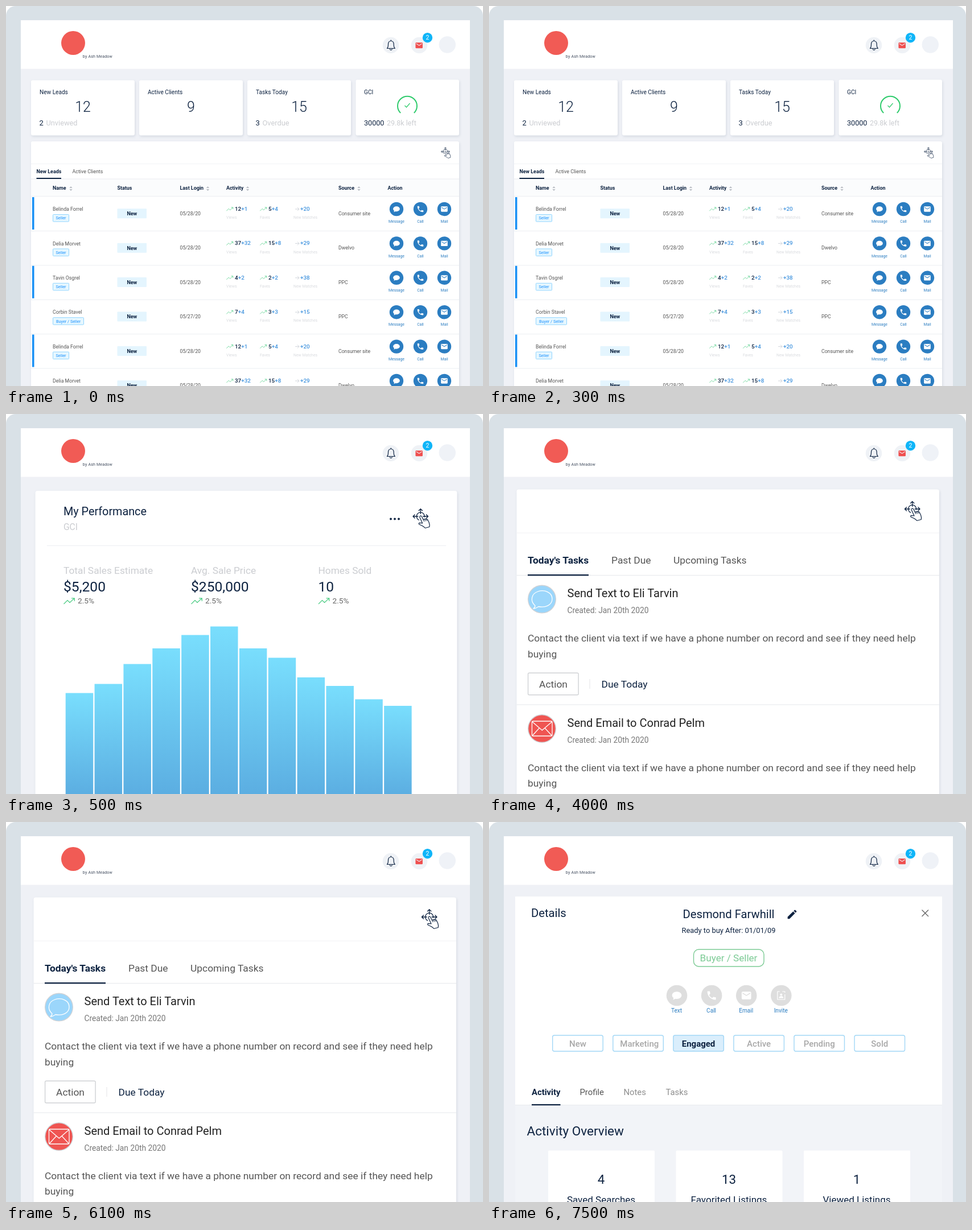
An HTML page that plays this animation: 838x668 px, repeating every 8000 ms.

```html
<!DOCTYPE html>
<html lang="en">
<head>
<meta charset="utf-8">
<title>Agent dashboard</title>
<style>
  html, body { margin: 0; width: 100%; height: 100%; overflow: hidden; background: #fff; }
  svg { display: block; width: 838px; height: 668px; font-family: Roboto, sans-serif; }
  .panel { filter: drop-shadow(1px 2px 2px rgba(40, 60, 90, .13)); }
</style>
</head>
<body>
<svg id="stage" viewBox="0 0 838 668"></svg>
<script>
const NAVY = '#0d2240', INK = '#222', GREY = '#555', PALE = '#cbcdd1', BLUE = '#2b7dc1', GREEN = '#57cf8b';

const ICONS = {
  chat: 'M12 4C6.5 4 2 7.4 2 11.6c0 2.2 1.2 4.1 3.2 5.5L4 21l5.2-2.2c.9.2 1.8.3 2.8.3 5.5 0 10-3.4 10-7.5S17.5 4 12 4z',
  phone: 'M6.6 10.8c1.4 2.8 3.8 5.1 6.6 6.6l2.2-2.2c.3-.3.7-.4 1-.3 1.1.4 2.3.6 3.6.6q1 0 1 1V20q0 1-1 1C10.6 21 3 13.4 3 4q0-1 1-1h3.5q1 0 1 1c0 1.2.2 2.4.6 3.6.1.3 0 .7-.3 1z',
  mail: 'M20 4H4a2 2 0 0 0-2 2v12a2 2 0 0 0 2 2h16a2 2 0 0 0 2-2V6a2 2 0 0 0-2-2zm0 4l-8 5-8-5V6l8 5 8-5z',
  pencil: 'M3 17.2V21h3.8L17.8 9.9l-3.7-3.7zM20.7 7q.7-.7 0-1.4l-2.3-2.3q-.7-.7-1.4 0l-1.9 1.8 3.8 3.8z',
};

// Text is placed by the vertical centre of its capitals.
const text = (x, y, size, str, fill = NAVY, weight = 400, anchor = 'start', extra = '') =>
  `<text x="${x}" y="${y + size * .355}" font-size="${size}" fill="${fill}" font-weight="${weight}" text-anchor="${anchor}" ${extra}>${str}</text>`;
const centred = (x, y, size, str, fill, weight) => text(x, y, size, str, fill, weight, 'middle');
const rect = (x, y, w, h, fill, extra = '') =>
  `<rect x="${x}" y="${y}" width="${w}" height="${h}" fill="${fill}" ${extra}/>`;
const panel = (x, y, w, h, r = 3) => rect(x, y, w, h, '#fff', `rx="${r}" class="panel"`);
const box = (x, y, w, h, r, stroke, fill = '#fff', width = 1.4) =>
  rect(x, y, w, h, fill, `rx="${r}" stroke="${stroke}" stroke-width="${width}"`);
const circle = (x, y, r, fill, extra = '') => `<circle cx="${x}" cy="${y}" r="${r}" fill="${fill}" ${extra}/>`;
const rule = (x, y, w, fill = '#eceef2', h = 1) => rect(x, y, w, h, fill);
const stroke = (d, colour, width, fill = 'none') =>
  `<path d="${d}" fill="${fill}" stroke="${colour}" stroke-width="${width}" stroke-linejoin="round"/>`;
const at = (x, y, scale, body) => `<g transform="translate(${x} ${y}) scale(${scale})">${body}</g>`;
const icon = (name, x, y, size, fill) =>
  at(x, y, size / 24, `<path d="${ICONS[name]}" fill="${fill}" transform="translate(-12 -12)"/>`);
const trend = (x, y, scale) =>
  at(x, y, scale, stroke('M.5 11 7 4.5 11 8.5 19 1M14 .8H19.3V6', GREEN, 1.3));
const each = (items, draw) => items.map(draw).join('');

const dragCursor = (x, y, scale = 1) => at(x, y, scale,
  each([0, 90, 270], turn => `<g transform="rotate(${turn})">${stroke('M0-4V-13M-3.5-9.8 0-13.3 3.5-9.8', NAVY, 1.3)}</g>`) +
  stroke('M-2.5 6.5A7 7 0 1 1 6.8 1.5', NAVY, 1.3) +
  stroke('M-.8-.8Q.8-1.800 2 .2L5 6Q5.500 4.300 7.300 5.200 8 3.700 9.800 4.900 11 3.900 12.300 5.500L14.800 10.500Q16.500 15 15.500 18.500L8 20.500Q6 18 3 16.500L-2.500 14Q-4 12-1.500 11.300L3.300 12-1.300 2Q-2 0-.8-.8Z', NAVY, 1.2, '#fff') +
  stroke('M5 6 6.5 9M7.300 5.200 9 8.500M9.800 4.900 11.500 8', NAVY, 1));

const frame = () =>
  rect(0, 0, 838, 700, '#d9e1e7', 'rx="17"') + rect(26, 25, 789, 643, '#eff1f6') + rect(26, 25, 789, 85.5, '#fff') +
  circle(118, 65, 21, '#f15b55') +
  text(187, 88.5, 7, 'by Ash Meadow', '#3f4a5c', 400, 'end', 'letter-spacing=".2"') +
  circle(676, 69, 14.3, '#eff2f6') + circle(726, 69, 14.3, '#eff2f6') + circle(775.3, 68, 14.7, '#eff2f7') +
  stroke('M669.5 74.5Q671.5 72.5 671.5 67.5C671.5 63 673.5 61.5 676.3 61.5S681.2 63 681.2 67.5Q681.2 72.5 683.3 74.5ZM676.3 61.5V59.5M674 75.5Q676.3 79.5 678.6 75.5', NAVY, 1.2) +
  icon('mail', 725.7, 69.3, 15, '#ef4f4f') +
  circle(740.5, 55.7, 8.7, '#0fb5f8') + centred(740.5, 55.7, 10.5, '2', '#fff');

const sorter = x =>
  `<path d="M${x - 2.7} 320l2.7-3 2.7 3zM${x - 2.7} 322l2.7 3 2.7-3z" fill="#b9bdc4"/>`;

function leadRow([name, kind, date, views, faves, matches, source], index) {
  const y = 365 + 60.4 * index, badge = kind === 'Seller' ? 29 : 55;
  const metric = (x, [count, added], label) =>
    trend(x, y - 11.5, .61) +
    text(x + 15, y - 8.5, 9.9, `${count}<tspan fill="#4294de">+${added}</tspan>`, NAVY, 500) +
    text(x, y + 6.7, 6.9, label, '#d9dbdf');
  const action = (x, glyph, label) =>
    circle(x, y - 8, 12.2, BLUE) + icon(glyph, x, y - 8, 14, '#fff') + centred(x, y + 13.8, 6.9, label, BLUE);
  return (index % 2 ? '' : rect(46, y - 29, 3.5, 57, '#1890f5')) +
    text(82, y - 8, 8.75, name, GREY) +
    box(82.5, y + 1.5, badge - 1, 12.5, 1, '#91d5ff', '#e6f7ff', 1) +
    centred(82 + badge / 2, y + 7.8, 7.3, kind, '#1890ff') +
    rect(195.5, y - 8.7, 51.5, 17, '#e4f5fe', 'rx="1"') + centred(221.3, y, 9, 'New', NAVY, 700) +
    text(305.5, y, 8.7, date, GREY) +
    metric(387, views, 'Views') + metric(446, faves, 'Faves') +
    stroke(`M508 ${y - 8}h7m-3-3 3 3-3 3`, '#c6cbd2', .8) +
    text(517, y - 8.5, 9.9, '+' + matches, '#4294de', 500) + text(505, y + 6.7, 6.9, 'New Matches', '#d9dbdf') +
    text(584, y, 8.7, source, GREY) +
    action(686, 'chat', 'Message') + action(728, 'phone', 'Call') + action(770, 'mail', 'Mail') +
    rule(44, y + 30, 752);
}

function leads() {
  const people = [
    ['Belinda Forrel', 'Seller', '05/28/20', [12, 1], [5, 4], 20, 'Consumer site'],
    ['Delia Morvet', 'Seller', '05/28/20', [37, 32], [15, 8], 29, 'Dwelvo'],
    ['Tavin Osgrel', 'Seller', '05/28/20', [4, 2], [2, 2], 38, 'PPC'],
    ['Corbin Stavel', 'Buyer / Seller', '05/27/20', [7, 4], [3, 3], 15, 'PPC'],
  ];
  const cards = [['New Leads', 12, 2, 'Unviewed'], ['Active Clients', 9], ['Tasks Today', 15, 3, 'Overdue']];
  const columns = [[82, 'Name', 114], [195.5, 'Status'], [305.5, 'Last Login', 354.5], [387, 'Activity', 424.5], [584, 'Source', 620], [670.5, 'Action']];
  return each(cards, ([title, total, count, note], i) => {
    const x = 44 + 190 * i;
    return panel(x, 130.5, 182, 97) + text(x + 15, 151.5, 10.1, title) + centred(x + 91, 177, 25, total, NAVY, 300) +
      (count ? text(x + 14.5, 205, 13, count) + text(x + 26.5, 205, 12.8, note, PALE) : '');
  }) +
    panel(614.5, 129.5, 181.5, 98) + text(629, 151, 10.1, 'GCI') +
    stroke('M693.2 188A17 17 0 1 1 716.8 188', '#2fcb6c', 2) + stroke('M700.5 175 703.5 178 709.5 171', '#2fcb6c', 1.2) +
    text(629, 205.5, 12.6, '30000') + text(669, 205.5, 12.5, '29.8k left', PALE) +
    panel(44, 238, 752, 440) + dragCursor(772, 256, .56) +
    rule(44, 277, 752, '#f1f3f6') + text(53.5, 291, 8.9, 'New Leads', NAVY, 700) + text(116.5, 291, 8.9, 'Active Clients', GREY) +
    rect(44, 304, 752, 30, '#fbfcfd') + rule(44, 303.5, 752) + rule(44, 334, 752) + rule(53.5, 302, 43.5, NAVY, 2) +
    each(columns, ([x, label, sort]) => text(x, 320, 8.9, label, NAVY, 700) + (sort ? sorter(sort) : '')) +
    each([...people, ...people.slice(0, 2)], leadRow);
}

function sales() {
  const stats = [[101, 'Total Sales Estimate', '$5,200'], [325, 'Avg. Sale Price', '$250,000'], [548.5, 'Homes Sold', '10']];
  const tops = [490.5, 474.5, 439.5, 412, 388.5, 373.5, 412, 428.5, 463, 478, 501.5, 513];
  return '<linearGradient id="bar" x2="0" y2="1"><stop stop-color="#79defd"/><stop offset="1" stop-color="#5bade1"/></linearGradient>' +
    panel(51.5, 135, 741, 550, 4) + text(101, 171, 19.8, 'My Performance') + text(101, 198.5, 15.6, 'GCI', PALE) +
    each([676, 683, 690], x => circle(x, 184.5, 1.9, NAVY)) + dragCursor(728.3, 180) + rule(72, 231, 701) +
    each(stats, ([x, label, value]) => text(x, 275, 17.3, label, PALE) + text(x, 303.5, 24.6, value) +
      trend(x, 323, 1) + text(x + 25, 328.5, 13.7, '2.5%', '#666')) +
    each(tops, (top, i) => rect(104.7 + 50.86 * i, top, 48.5, 672 - top, 'url(#bar)'));
}

function tasks() {
  const bubble = 'M81 337C72 329 74 316 86 312 98 308 111 314 111 325S99 341 87 338.5Q82 342 78 342 81 340 81 337Z';
  const envelope = 'M77.5 540h31.5a2 2 0 0 1 2 2v22a2 2 0 0 1-2 2h-31.5a2 2 0 0 1-2-2v-22a2 2 0 0 1 2-2zM76 541l17.3 15 17.3-15M76 565.5l12.5-13.5M110.5 565.5 98 552';
  const task = (y, title, fill, glyph) =>
    circle(93, y + 10.5, 24.3, fill, 'stroke="#cfd2d6" stroke-width="1.4"') + stroke(glyph, '#fff', 1.3) +
    text(137.5, y, 20, title, INK) + text(137.5, y + 30.5, 13.8, 'Created: Jan 20th 2020', '#777') +
    text(68, y + 79, 17.42, 'Contact the client via text if we have a phone number on record and see if they need help', GREY) +
    text(68, y + 106.5, 17.42, 'buying', GREY);
  return panel(48.5, 132.5, 742.5, 560, 4) + dragCursor(743.7, 167) + rule(48.5, 208.5, 742.5, '#f1f2f5') +
    text(68, 257, 17.35, "Today's Tasks", NAVY, 700) + text(215, 257, 17.4, 'Past Due', GREY) + text(324, 257, 17.4, 'Upcoming Tasks', GREY) +
    rule(48.5, 283, 742.5, '#e6e8eb') + rule(68, 282, 107, NAVY, 2.3) +
    task(315, 'Send Text to Eli Tarvin', '#9bd6fb', bubble) +
    box(68.6, 455.2, 88.5, 38.5, 2, '#d0d2d5') + centred(113, 475, 17.4, 'Action', GREY) +
    rect(176.5, 466, 1, 17, '#e3e5e8') + text(197.5, 475, 17.4, 'Due Today') + rule(48.5, 510.5, 742.5, '#e6e8eb') +
    task(542.5, 'Send Email to Conrad Pelm', '#ef5552', envelope);
}

function details() {
  const invite = stroke('M-2.5-7H-6.5V7H6.5V-2M2-7H6.5V-5', '#fff', 1.2) +
    circle(0, -1.5, 2, '#fff') + '<path d="M-4 4.5Q-4 1 0 1T4 4.5Z" fill="#fff"/>';
  const contacts = [['Text', 'chat'], ['Call', 'phone'], ['Email', 'mail'], ['Invite']];
  const stages = ['New', 'Marketing', 'Engaged', 'Active', 'Pending', 'Sold'];
  const tabs = [[75, 'Activity', NAVY, 700], [159.5, 'Profile', GREY], [236.5, 'Notes', '#8d8d8d'], [310.5, 'Tasks', '#8d8d8d']];
  const totals = [[4, 'Saved Searches'], [13, 'Favorited Listings'], [1, 'Viewed Listings']];
  return rect(46, 131, 750, 537, '#f2f4f8') + rect(46, 131, 750, 366.5, '#fff') +
    text(74, 160, 20.2, 'Details') + centred(421, 162, 20.2, 'Desmond Farwhill') + icon('pencil', 532.5, 162.3, 21, NAVY) +
    stroke('M760.5 154.5 772 166M772 154.5 760.5 166', '#666', 1.3) +
    centred(421, 190, 12.85, 'Ready to buy After: 01/01/09') +
    box(359.5, 224, 123.5, 30, 9, '#7ccb95') + centred(421, 239.2, 17.1, 'Buyer / Seller', '#7ccb95') +
    each(contacts, ([label, glyph], i) => {
      const x = 330 + 61.1 * i;
      return circle(x, 305, 18.3, '#dedede') + (glyph ? icon(glyph, x, 305, 20, '#fff') : at(x, 305, 1, invite)) +
        centred(x - .5, 331.3, 10.1, label, BLUE);
    }) +
    each(stages, (label, i) => {
      const x = 111.7 + 106.07 * i, active = label === 'Engaged';
      return box(x, 375, 88.5, 28, 3, '#a2d7f6', active ? '#daeefc' : '#fff') +
        centred(x + (label === 'Marketing' ? 46.5 : 44.2), 390, 15, label, active ? NAVY : '#a8a8a8', active ? 700 : 500);
    }) +
    each(tabs, ([x, label, fill, weight]) => text(x, 475.2, 14.8, label, fill, weight)) +
    rule(46, 497, 750, '#e9ebef') + rule(75, 496, 50.5, NAVY, 2.2) +
    text(66.5, 543.5, 22.5, 'Activity Overview') +
    each(totals, ([count, label], i) => {
      const x = 104 + 224.5 * i;
      return rect(x, 577.5, 187, 100, '#fff', 'rx="2"') + centred(x + 93, 628, 22.3, count) + centred(x + 93, 664, 17, label);
    });
}

const stage = document.getElementById('stage');
stage.innerHTML = frame() + each([leads, sales, tasks, details], scene => `<g class="scene">${scene()}</g>`);
const scenes = stage.querySelectorAll('.scene');
const STARTS = [0, 500, 4000, 7500], LOOP = 8000;

function tick() {
  const time = performance.now() % LOOP;
  const current = STARTS.findLastIndex(start => time >= start);
  scenes.forEach((scene, i) => scene.setAttribute('visibility', i === current ? 'visible' : 'hidden'));
  requestAnimationFrame(tick);
}
tick();
</script>
</body>
</html>
```
